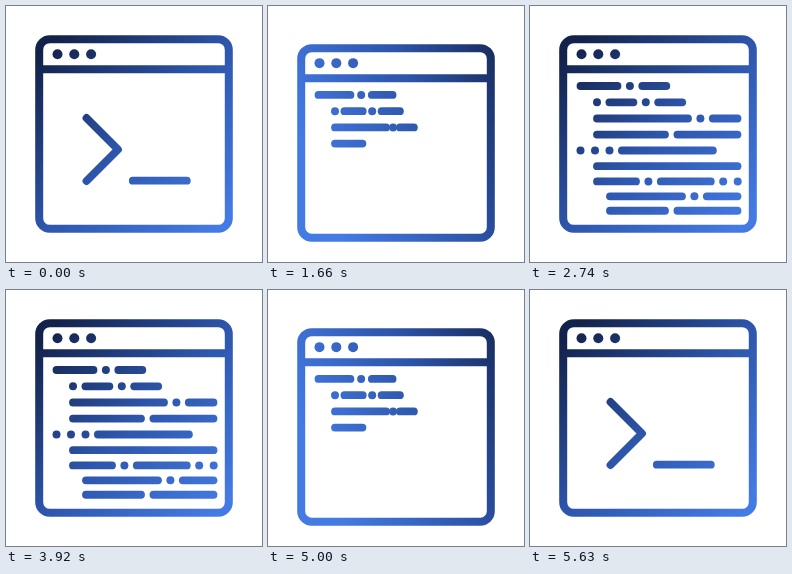
An HTML page with a canvas for the animation above (5.66 s loop, 256 by 256 pixels).

```html
<!DOCTYPE html>
<html lang="en">
<head>
<meta charset="utf-8">
<title>Terminal to code</title>
<style>
  html, body { margin: 0; width: 100%; height: 100%; overflow: hidden; background: #fff; }
  canvas { display: block; width: 100vw; height: 100vh; }
</style>
</head>
<body>
<canvas id="stage"></canvas>
<script>
const LOOP = 5660, STEP = 30;
const OPEN_AT = 1030, CLOSE_AT = 3920, SPAN = 1710;
const GAP = 12.4, DOT_GAP = 14.5, RIGHT = 207.5;
const MARGIN = 50.5, INDENT = 67, DEEP = 80;

const canvas = document.getElementById('stage');
const ctx = canvas.getContext('2d');

// Left edge, then dash lengths: 0 is a dot, Infinity fills the row
const rows = [
  [MARGIN, 37, 0, 24],
  [INDENT, 0, 24, 0, 24],
  [INDENT, 91, 0, Infinity],
  [INDENT, 68, Infinity],
  [MARGIN, 0, 0, 0, 91],
  [INDENT, Infinity],
  [INDENT, 39, 0, 50, 0, 0],
  [DEEP, 72, 0, Infinity],
  [DEEP, 55, Infinity]
].map(layOut);

function layOut([left, ...lengths], i) {
  let x = left;
  const dashes = lengths.map((len, j) => {
    const end = Math.min(RIGHT + 1, x + len, len === Infinity ? RIGHT : x + len);
    const dash = [x, end];
    x = end + (len === 0 && lengths[j + 1] === 0 ? DOT_GAP : GAP);
    return dash;
  });
  // Lower rows start later and settle more slowly
  return {
    left, dashes,
    y: 80 + 16.3 * i - 0.011 * i ** 3,
    start: 485 + 42 * i,
    power: 0.8 + 15 / (1 + (i / 4.1) ** 4)
  };
}

const clamp = v => Math.min(1, Math.max(0, v));
const smooth = v => 0.5 - 0.5 * Math.cos(Math.PI * clamp(v));

// Position inside the transition: 0 is the prompt, SPAN is the code
function phase(time) {
  const closing = time >= CLOSE_AT;
  const since = Math.floor((time - (closing ? CLOSE_AT : OPEN_AT)) / STEP) * STEP;
  return Math.min(SPAN, Math.max(0, closing ? SPAN - since : since));
}

function drop(t) {
  return 12 * (smooth(t / 380) - smooth((t - 380) / 740));
}

// The gradient makes one turn and drifts towards its dark side midway
function paint(t) {
  const p = t / SPAN;
  const a = (0.25 + 2 * p ** 1.17) * Math.PI;
  const shift = 38 * Math.sin(Math.PI * p);
  const point = r => [128 + r * Math.cos(a), 128 + r * Math.sin(a)];
  const g = ctx.createLinearGradient(...point(-122 - shift), ...point(122 - shift));
  g.addColorStop(0, '#13224a');
  g.addColorStop(0.5, '#2d55aa');
  g.addColorStop(1, '#447ae3');
  return g;
}

function stroke(...pts) {
  ctx.beginPath();
  ctx.moveTo(pts[0], pts[1]);
  for (let i = 2; i < pts.length; i += 2) ctx.lineTo(pts[i], pts[i + 1]);
  ctx.stroke();
}

function dot(x, y, r) {
  ctx.beginPath();
  ctx.arc(x, y, r, 0, 7);
  ctx.fill();
}

function drawWindow() {
  ctx.lineWidth = 8;
  ctx.beginPath();
  ctx.roundRect(33.2, 33.2, 189.6, 189.6, 10.5);
  ctx.stroke();
  stroke(36, 63.2, 220, 63.2);
  for (let i = 0; i < 3; i++) dot(51.5 + 16.8 * i, 48.2, 5);
}

function drawPrompt(t) {
  const arm = 31.5 * (1 - smooth((t - 300) / 170));
  const slide = clamp(t / 450);
  if (arm > 0) {
    const tip = 112 + 31.5 * slide;
    stroke(tip - arm, 143.5 - arm, tip, 143.5, tip - arm, 143.5 + arm);
  }
  if (slide < 1) stroke(126.8 + 54 * slide ** 2, 174.7, 180.8, 174.7);
}

function drawCode(t) {
  for (const { left, dashes, y, start, power } of rows) {
    if (t <= start) continue;
    const k = 1 - (1 - (t - start) / (SPAN - start)) ** power;
    const at = x => left + (x - left) * k;
    for (const [from, to] of dashes) {
      if (from === to) dot(at(from), y, 4);
      else stroke(at(from), y, at(to), y);
    }
  }
}

function frame() {
  const ratio = window.devicePixelRatio || 1;
  const w = Math.round(innerWidth * ratio), h = Math.round(innerHeight * ratio);
  if (canvas.width !== w || canvas.height !== h) {
    canvas.width = w;
    canvas.height = h;
  }
  const t = phase(performance.now() % LOOP);
  ctx.setTransform(1, 0, 0, 1, 0, 0);
  ctx.fillStyle = '#fff';
  ctx.fillRect(0, 0, w, h);
  ctx.setTransform(w / 256, 0, 0, h / 256, 0, 0);
  ctx.translate(0, drop(t));
  ctx.fillStyle = ctx.strokeStyle = paint(t);
  ctx.lineCap = ctx.lineJoin = 'round';
  drawWindow();
  ctx.lineWidth = 7.8;
  drawPrompt(t);
  drawCode(t);
  requestAnimationFrame(frame);
}
frame();
</script>
</body>
</html>
```
